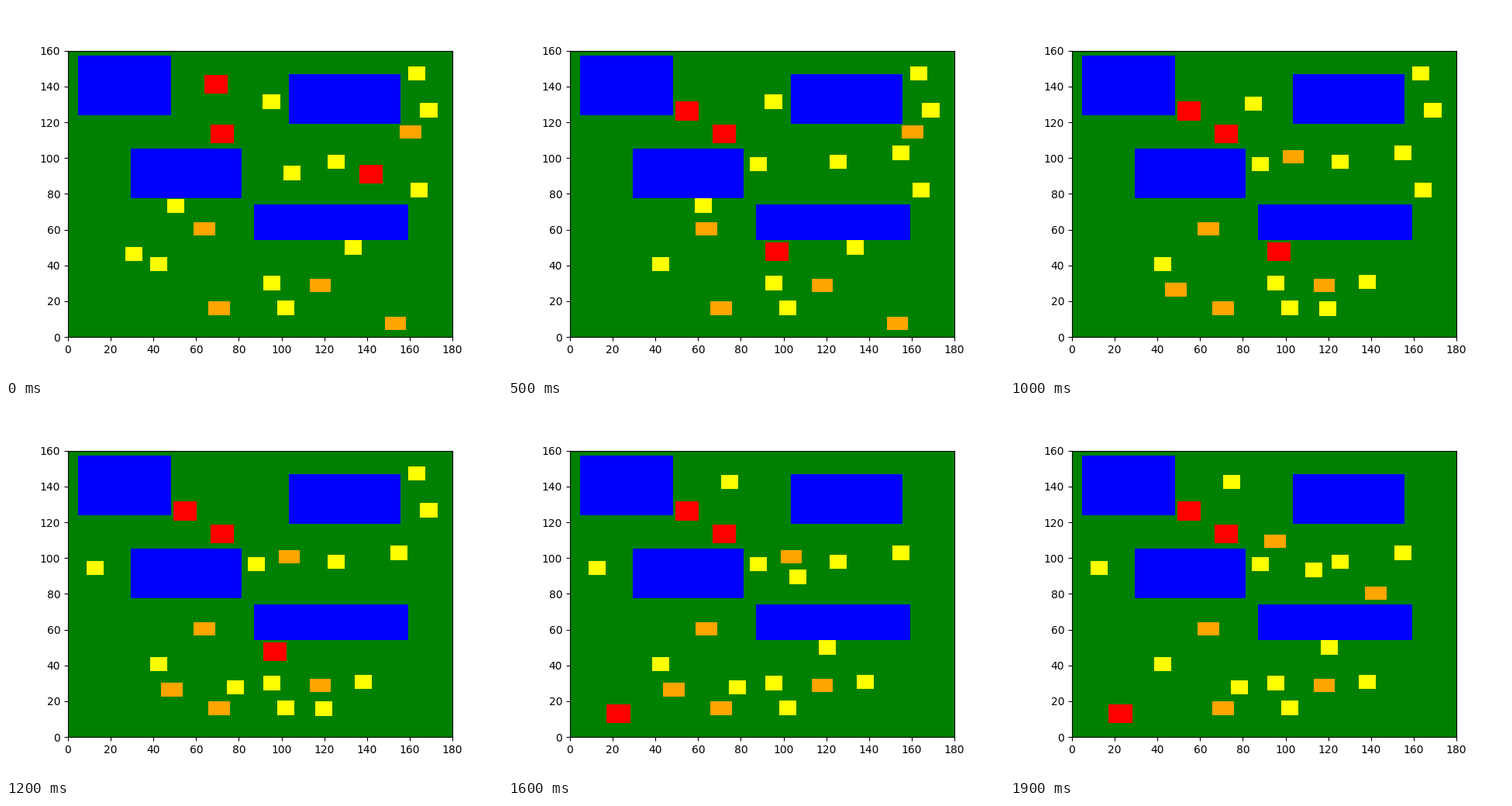
A matplotlib script that plays this animation: 640 px wide and 480 px high, repeating every 2000 ms.

```python
import matplotlib.pyplot as plt
from matplotlib.animation import FuncAnimation
from matplotlib.patches import Rectangle

WIDTH, HEIGHT = 180, 160
STEP_MS = 100

# A fifth of the map is water, shared equally by four lakes: left, bottom, width
LAKES = [(4.7, 123.9, 43.4), (103.55, 119.1, 52), (29.4, 77.6, 52), (87.1, 54.2, 72.2)]
LAKE_AREA = WIDTH * HEIGHT / 5 / len(LAKES)

SIZES = {"yellow": (8, 8), "orange": (10, 7.5), "red": (11, 10.5)}

SETTLED = {
    "red": [(66.75, 108.3)],
    "yellow": [(121.6, 94), (38.5, 36.8), (91.4, 26.2), (98, 12.3)],
    "orange": [(58.8, 56.8), (113.15, 25.2), (65.7, 12.35)],
}

# Stops of each moving house, and the house that jumps at each step
ROUTES = {
    "a": ("red", [(63.9, 136), (49.4, 121)]),
    "b": ("red", [(136.5, 85.8), (91.4, 42.5), (17.2, 7.9)]),
    "c": ("yellow", [(26.9, 42.4), (84.2, 92.7)]),
    "d": ("yellow", [(100.9, 87.6), (151, 98.9)]),
    "e": ("yellow", [(46.5, 69.3), (58.4, 69.4), (80.9, 126.4), (8.7, 90.5)]),
    "f": ("yellow", [(91.26, 127.5), (115.8, 11.9), (116.5, 46.1)]),
    "g": ("orange", [(155.4, 110.8), (43.6, 22.75), (137.2, 76.7)]),
    "h": ("yellow", [(129.6, 46.1), (134.3, 26.8)]),
    "i": ("orange", [(148.3, 4), (98.65, 97), (90, 105.6)]),
    "j": ("yellow", [(160.4, 78.1), (74.4, 23.8)]),
    "k": ("yellow", [(164.93, 122.7), (102.7, 85.5), (109.2, 89.3)]),
    "l": ("yellow", [(159.3, 143.3), (70.8, 138.6)]),
}
JUMPS = "abcdefgehijekblfkig"

fig, ax = plt.subplots(figsize=(6.4, 4.8), dpi=100)
ax.set(xlim=(0, WIDTH), ylim=(0, HEIGHT), facecolor="green")


def add_rect(spot, size, color):
    return ax.add_patch(Rectangle(spot, *size, facecolor=color, linewidth=0))


for x, y, w in LAKES:
    add_rect((x, y), (w, LAKE_AREA / w), "blue")

for color, spots in SETTLED.items():
    for spot in spots:
        add_rect(spot, SIZES[color], color)

movers = {
    name: add_rect(stops[0], SIZES[color], color)
    for name, (color, stops) in ROUTES.items()
}


def update(step):
    done = JUMPS[:step]
    for name, house in movers.items():
        house.set_xy(ROUTES[name][1][done.count(name)])
    return list(movers.values())


anim = FuncAnimation(fig, update, frames=len(JUMPS) + 1, interval=STEP_MS,
                     repeat=True, repeat_delay=0)
plt.show()
```
